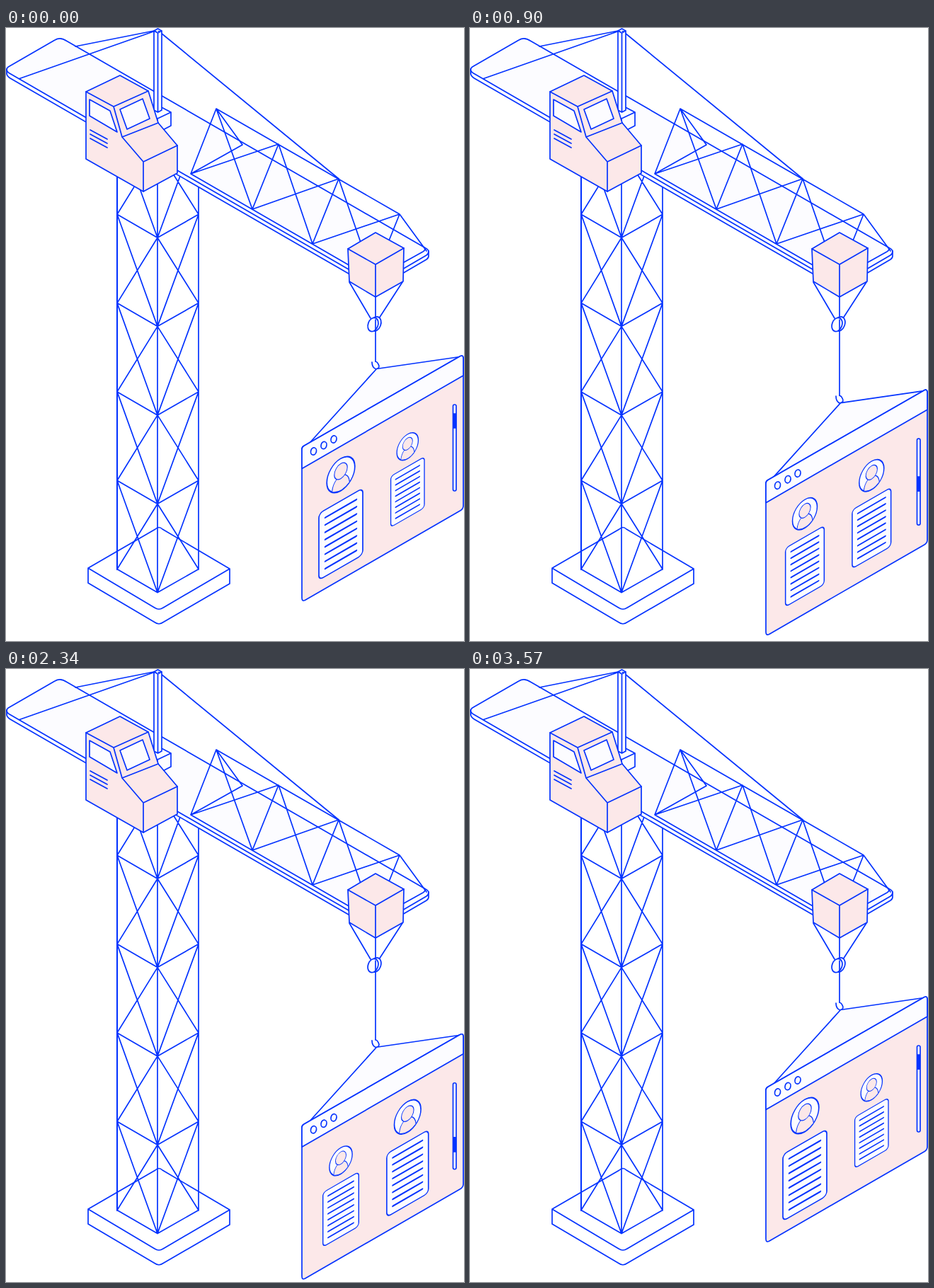
Recreate the animation shown at these times as an HTML page. Size 647 by 866 pixels, loop 3600 ms.

```html
<!DOCTYPE html>
<html lang="en">
<head>
<meta charset="utf-8">
<title>Crane</title>
<style>
  html, body { margin: 0; width: 100%; height: 100%; overflow: hidden; background: #fff; }
  svg { display: block; stroke: #0433ff; stroke-width: 1.7; stroke-linejoin: round; stroke-linecap: round; fill: none; }
  .pale { fill: #fcfcff; }
  .pink { fill: #fce8e9; }
  .thin { stroke-width: 1.1; }
</style>
</head>
<body>
<svg width="647" height="866" viewBox="0 0 647 866">
  <defs>
    <g id="card">
      <g transform="skewY(-30)">
        <ellipse class="pale" cy="-60.500" rx="19.800" ry="22.800"/>
        <path class="pink thin" d="M-12.500-43Q-11.500-53.500-5.500-57.500H5.500Q11.500-53.500 12.500-43Q0-33.500-12.500-43Z"/>
        <ellipse class="pink thin" cy="-65.500" rx="9.200" ry="10.600"/>
        <rect class="pale" x="-31" y="-23.500" width="62" height="94" rx="6"/>
        <path id="lines" stroke-width="2.400"/>
      </g>
    </g>
  </defs>

  <!-- base and tower -->
  <path d="M116 763L211 708Q216 703 221 708L316 764L222 819Q216 823 210 819ZV784L210 839.500Q216 844 222 839.500L316 785V764"/>
  <path id="tower"/>
  <path d="M157 210V765" stroke-width="2.100"/>

  <!-- boom -->
  <path class="pale" d="M4 54.500L69 17Q77 12 86 18.500L592 310.500Q597 313 597 316V322Q597 325 594 327L522 369L6 71Q1 68 1 64V59Q1 56 4 54.500Z"/>
  <path d="M1 58Q1 62 5 64L522 363L594 321Q597 319 597 315M590 309.500Q594 313 589 316L519 355L261 206L334 165L297 114L261 206L385 164L348 256L470 213L433 305L556 263L519 355L470 213M433 305L385 164M348 256L297 114L556 263L594 315"/>
  <path d="M98 26L214 3L19 71.500M214 3L470 213"/>

  <!-- mast -->
  <path class="pale" d="M195 119L214 109L233 119V138L214 148L195 138ZL214 128L233 119M214 128V148"/>
  <path class="pale" d="M209 4L214.500 1L220 4V116L214.500 119L209 116ZL214.500 7L220 4M214.500 7V119"/>

  <!-- cabin -->
  <path class="pink" d="M113 90L161 67L201 89L215 134L242 166V205L194 231L113 185Z"/>
  <path d="M113 90L152 111L201 89M152 111L164 154L215 134M164 154L194 189L242 166M194 189V231M119 144L143 157M119 150L143 163M119 156L143 169"/>
  <path class="pale" d="M118 101L147 117L157 147L118 124ZM161 115L193 100L203 128L171 143Z"/>

  <!-- trolley and pulley -->
  <path class="pink" d="M483 312L522 289L562 311L561 358L522 380L485 358Z"/>
  <path d="M483 312L522 334L562 311M522 334V408M485 359L515 410M560 359L527 410"/>
  <g class="pale">
    <ellipse cx="522" cy="418" rx="7.500" ry="10.500" transform="rotate(20 522 418)"/>
    <ellipse cx="518.500" cy="419" rx="7" ry="10" transform="rotate(20 518.500 419)"/>
  </g>
  <path id="cable"/>

  <!-- hanging window -->
  <g id="load">
    <path d="M517 472Q517 480 523 482Q529 480 526 475Q525 472 522 471"/>
    <path class="pale" d="M429 586L523.500 481.500L641 464.500"/>
    <path class="pink" d="M418 595Q418 592 421 590.300L641 464Q646 461 646 467V675Q646 679.500 641 682.300L423 808Q418 811 418 805Z"/>
    <path class="pale" d="M418 622.500V595Q418 592 421 590.300L641 464Q646 461 646 467V491Z"/>
    <g id="dots"></g>
    <rect class="pale" x="631.500" y="532" width="4.500" height="122" rx="2.200"/>
    <rect id="thumb" x="632" y="545" width="3.500" height="20" fill="#0433ff"/>
    <use id="left" href="#card"/>
    <use id="right" href="#card"/>
  </g>
</svg>
<script>
const $ = id => document.getElementById(id);
const LOOP = 3600, DROP = 57, STEP = 125.3;

let braces = 'M214 171V797M272 200V765';
for (let i = 0; i < 6; i++) {
  const side = 138 + i * STEP, mid = side + 33;
  for (const x of [157, 272]) {
    braces += `M${x} ${side}L214 ${mid}`;
    if (i < 5) braces += `M${x} ${side}L214 ${mid + STEP}M214 ${mid}L${x} ${side + STEP}`;
  }
}
$('tower').setAttribute('d', braces);

let lines = '';
for (let i = 0; i < 8; i++) lines += `M-22 ${-12.6 + i * 10.3}h44`;
$('lines').setAttribute('d', lines);

$('dots').innerHTML = [[434.5, 598], [449, 589.5], [463, 581]]
  .map(([x, y]) => `<ellipse cx="${x}" cy="${y}" rx="3.9" ry="5.2" transform="rotate(15 ${x} ${y})"/>`).join('');

// Eased 0..1 progress from a start time over a duration
function ease(t, start, duration) {
  const x = Math.min(1, Math.max(0, (t - start) / duration));
  return x * x * (3 - 2 * x);
}

const place = (id, x, y, scale = 1) =>
  $(id).setAttribute('transform', `translate(${x} ${y}) scale(${scale})`);

function draw(now) {
  const t = now % LOOP;
  const drop = DROP * (ease(t, 0, 1200) - ease(t, 2140, 1200));
  const swap = ease(t, 0, 1800) - ease(t, 1800, 1800);
  $('cable').setAttribute('d', `M522 412V${471 + drop}`);
  place('load', 0, drop);
  place('thumb', 0, 82 * swap);
  place('left', 473, 691.5, 1 - 0.235 * swap);
  place('right', 567.3, 637.5, 0.765 + 0.235 * swap);
  requestAnimationFrame(draw);
}
draw(0);
</script>
</body>
</html>
```
